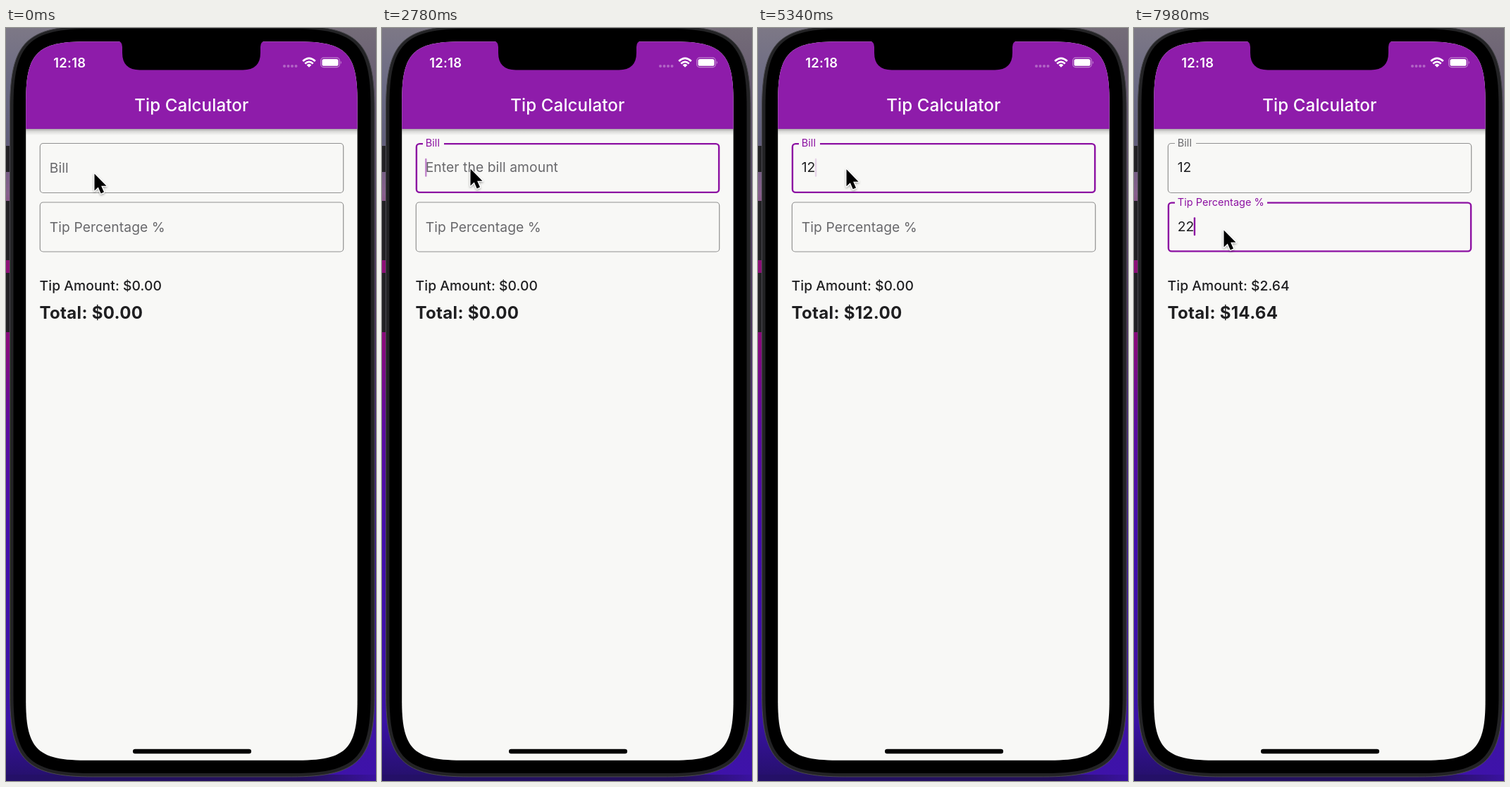
Animation of 525 by 1067 pixels, one loop 8000 ms. Source, as an HTML page:

```html
<!DOCTYPE html>
<html lang="en">
<head>
<meta charset="utf-8">
<title>Tip Calculator</title>
<style>
  html, body { margin: 0; width: 100%; height: 100%; overflow: hidden; background: #000; }
  svg { display: block; width: 100vw; height: 100vh; }
  text { font-family: Inter, "Liberation Sans", sans-serif; font-size: 19.3px; font-optical-sizing: none; letter-spacing: .06px; fill: #1f1f21; white-space: pre; }
</style>
</head>
<body>
<svg id="stage" viewBox="0 0 525 1067" xmlns="http://www.w3.org/2000/svg">
  <defs>
    <linearGradient id="wall" x1="0" y1="0" x2="0" y2="1">
      <stop offset="0" stop-color="#7d7886"/>
      <stop offset=".08" stop-color="#6a6a84"/>
      <stop offset=".15" stop-color="#605e7a"/>
      <stop offset=".22" stop-color="#87608c"/>
      <stop offset=".31" stop-color="#8c1076"/>
      <stop offset=".42" stop-color="#880a7c"/>
      <stop offset=".53" stop-color="#5c0ca0"/>
      <stop offset=".68" stop-color="#420eac"/>
      <stop offset=".92" stop-color="#3a12a6"/>
      <stop offset="1" stop-color="#241068"/>
    </linearGradient>
    <linearGradient id="wallRight" x1="0" y1="0" x2="0" y2="1">
      <stop offset="0" stop-color="#746c78"/>
      <stop offset=".1" stop-color="#645870"/>
      <stop offset=".4" stop-color="#4a3060"/>
      <stop offset=".7" stop-color="#3c1890"/>
      <stop offset="1" stop-color="#3e12aa"/>
    </linearGradient>
    <linearGradient id="floor">
      <stop offset="0" stop-color="#241068"/>
      <stop offset=".8" stop-color="#241058"/>
      <stop offset="1" stop-color="#3a12a0"/>
    </linearGradient>
    <linearGradient id="shade" x1="0" y1="0" x2="0" y2="1">
      <stop offset="0" stop-color="#000" stop-opacity=".32"/>
      <stop offset=".4" stop-color="#000" stop-opacity=".12"/>
      <stop offset="1" stop-color="#000" stop-opacity="0"/>
    </linearGradient>
    <clipPath id="screen"><path id="glass"/></clipPath>
    <filter id="soft" x="-50%" y="-50%" width="200%" height="200%">
      <feDropShadow dx="0" dy="1.5" stdDeviation="1.5" flood-opacity=".35"/>
    </filter>
  </defs>

  <rect width="263" height="1067" fill="url(#wall)"/>
  <rect x="262" width="263" height="1067" fill="url(#wallRight)"/>
  <rect y="1058" width="525" height="9" fill="url(#floor)"/>
  <g fill="#222124">
    <rect x="-3" y="167" width="10" height="37" rx="2"/>
    <rect x="-3" y="245" width="10" height="84" rx="2"/>
    <rect x="-3" y="347" width="10" height="84" rx="2"/>
  </g>
  <path id="body" fill="#232325" stroke="#4a494e"/>
  <path id="bezel"/>

  <g clip-path="url(#screen)">
    <rect x="28" y="19" width="471" height="1019" fill="#f8f8f6"/>
    <rect x="28" y="143" width="471" height="9" fill="url(#shade)"/>
    <rect x="28" y="19" width="471" height="124" fill="#8e1caa"/>
  </g>
  <path d="M158 18Q165 19 165 27V35Q165 59.5 190 59.5H336Q361 59.5 361 35V27Q361 19 368 18Z"/>

  <text x="67.2" y="56" style="font-size:18.4px;font-weight:600;letter-spacing:.3px;fill:#fff">12:18</text>
  <g fill="#fff" fill-opacity=".32">
    <circle cx="395" cy="54" r="2"/><circle cx="400.5" cy="54" r="2"/>
    <circle cx="406" cy="54" r="2"/><circle cx="411.5" cy="54" r="2"/>
  </g>
  <g fill="none" stroke="#fff" stroke-width="2.7">
    <path d="M421.2 47Q430 38.8 438.8 47"/>
    <path d="M424.3 50.4Q430 45.2 435.7 50.4"/>
  </g>
  <path d="M426.6 52.4Q430 49.6 433.4 52.4L430 55.8Z" fill="#fff"/>
  <rect x="446.7" y="42.2" width="26.6" height="13.4" rx="4" fill="none" stroke="#fff" stroke-opacity=".45" stroke-width="1.2"/>
  <rect x="448.5" y="44" width="23" height="9.8" rx="2.6" fill="#fff"/>
  <path d="M474.8 46.8Q477 49 474.8 51.2Z" fill="#fff" fill-opacity=".5"/>
  <text x="263.3" y="118.4" text-anchor="middle" style="font-size:24.1px;font-weight:500;letter-spacing:.12px;fill:#fff">Tip Calculator</text>

  <g id="fields"></g>

  <text id="tip" x="47.6" y="371.7" style="font-weight:500"></text>
  <text id="total" x="47.6" y="411.6" style="font-size:24.1px;font-weight:700;letter-spacing:.27px"></text>
  <rect x="180" y="1021.8" width="168" height="6.4" rx="3.2"/>
  <path id="pointer" d="M0 0V24L5.3 18.9L9.2 28L13.5 26.1L9.6 17.3H17Z" stroke="#fff" stroke-width="2.4" stroke-linejoin="round" paint-order="stroke" filter="url(#soft)"/>
</svg>
<script>
const LOOP = 8000;
const NS = "http://www.w3.org/2000/svg";
const SURFACE = "#f8f8f6", PURPLE_CSS = "#8c10a2", GREY_CSS = "#68686b";
const GREY = [104, 104, 107], PURPLE = [140, 16, 162], LINE = [146, 146, 146];
const byId = id => document.getElementById(id);

const clamp = v => Math.max(0, Math.min(1, v));
const lerp = (a, b, p) => a + (b - a) * p;
const smooth = p => p * p * (3 - 2 * p);
const easeOut = p => 1 - (1 - p) ** 1.8;
const ramp = (t, from, time) => smooth(clamp((t - from) / time));
const mix = (a, b, p) => `rgb(${a.map((v, i) => Math.round(lerp(v, b[i], p)))})`;

function set(node, attrs) {
  for (const key in attrs) node.setAttribute(key, attrs[key]);
}

function add(tag, attrs, parent) {
  const node = document.createElementNS(NS, tag);
  set(node, attrs);
  parent.append(node);
  return node;
}

// Rounded box whose corners ease gradually into the straight sides
function softBox(x, y, w, h, r) {
  const reach = r * 1.48, pull = r * .287;
  const corner = (cx, cy, dx, dy, turn) => {
    const a = [cx + dx * reach, cy], b = [cx + dx * pull, cy];
    const c = [cx, cy + dy * pull], d = [cx, cy + dy * reach];
    const [p, q, s, e] = turn ? [a, b, c, d] : [d, c, b, a];
    return `L${p}C${q} ${s} ${e}`;
  };
  const path = corner(x, y, 1, 1, false) + corner(x + w, y, -1, 1, true)
    + corner(x + w, y + h, -1, -1, false) + corner(x, y + h, 1, -1, true);
  return "M" + path.slice(1) + "Z";
}

set(byId("body"), { d: softBox(5.5, -3, 517.5, 1064, 80) });
set(byId("bezel"), { d: softBox(10.5, 1, 507, 1055, 75) });
set(byId("glass"), { d: softBox(28.2, 19.2, 470.4, 1018.5, 57) });

// Each key is [time, value]
const specs = [
  { top: 163.5, title: "Bill", prompt: "Enter the bill amount", gapWidth: 30,
    focus: 1050, blur: 6560, keys: [[3300, "1"], [3530, "12"]] },
  { top: 247, title: "Tip Percentage %", prompt: "Enter the tip percentage", gapWidth: 131,
    focus: 6560, blur: LOOP, keys: [[7600, "2"], [7860, "22"]] }
];

function makeField(spec) {
  const g = byId("fields");
  const { top } = spec;
  const box = add("rect", { rx: 4.5, fill: "none" }, g);
  const gap = add("rect", { y: top - 2, height: 5, fill: SURFACE }, g);
  const hint = add("text", { x: 61.7, y: top + 40.6, style: `fill:${GREY_CSS}` }, g);
  const input = add("text", { x: 61.7, y: top + 40.8 }, g);
  const label = add("text", {}, g);
  const caret = add("rect", { y: top + 21.3, width: 2.4, height: 26, rx: 1, fill: PURPLE_CSS }, g);
  hint.textContent = spec.prompt;
  label.textContent = spec.title;
  return { ...spec, box, gap, hint, input, label, caret };
}

const fields = specs.map(makeField);

const lastKey = (field, t) => field.keys.filter(k => k[0] <= t).pop();
const valueAt = (field, t) => (lastKey(field, t) || [0, ""])[1];

// Solid for 650 ms after a reset, then a soft toggle every 500 ms
function caretAlpha(age) {
  if (age < 650) return 1;
  const step = Math.floor((age - 650) / 500);
  const p = easeOut(clamp(((age - 650) % 500) / 250));
  return step % 2 ? p : 1 - p;
}

function drawField(field, t) {
  const { top, focus, blur, gapWidth } = field;
  const lift = ramp(t, focus, 180);
  const active = lift * (1 - ramp(t, blur, 180));
  const value = valueAt(field, t);
  const key = lastKey(field, t);
  const line = lerp(1.2, 2.4, active);

  // The outline grows inwards
  set(field.box, {
    x: 47.7 + line / 2, y: top - .6 + line / 2,
    width: 431.6 - line, height: 71.2 - line,
    stroke: mix(LINE, PURPLE, active), "stroke-width": line
  });
  set(field.gap, { x: 58 + gapWidth * (1 - lift) / 2, width: gapWidth * lift });
  set(field.label, {
    transform: `translate(61.8 ${lerp(top + 41.7, top + 4.9, lift)}) scale(${lerp(1, .75, lift)})`
  });
  field.label.style.fill = mix(GREY, PURPLE, active);
  set(field.hint, { opacity: value ? 0 : lift });
  field.input.textContent = value;

  const shown = t >= focus && t < blur;
  const width = value ? field.input.getComputedTextLength() : 0;
  set(field.caret, {
    x: 61.1 + width,
    opacity: shown ? caretAlpha(t - (key ? key[0] : focus)) : 0
  });
}

function draw(t) {
  fields.forEach(field => drawField(field, t));
  const [bill, percent] = fields.map(field => Number(valueAt(field, t)));
  const tip = bill * percent / 100;
  byId("tip").textContent = `Tip Amount: $${tip.toFixed(2)}`;
  byId("total").textContent = `Total: $${(bill + tip).toFixed(2)}`;

  const settle = ramp(t, 250, 550), descend = ramp(t, 5300, 700);
  const x = lerp(125.5, 127.5, descend);
  const y = lerp(lerp(206.5, 199.5, settle), 286.5, descend);
  set(byId("pointer"), { transform: `translate(${x} ${y})` });
}

const start = performance.now();
function tick() {
  draw((performance.now() - start) % LOOP);
  requestAnimationFrame(tick);
}
tick();
</script>
</body>
</html>
```
